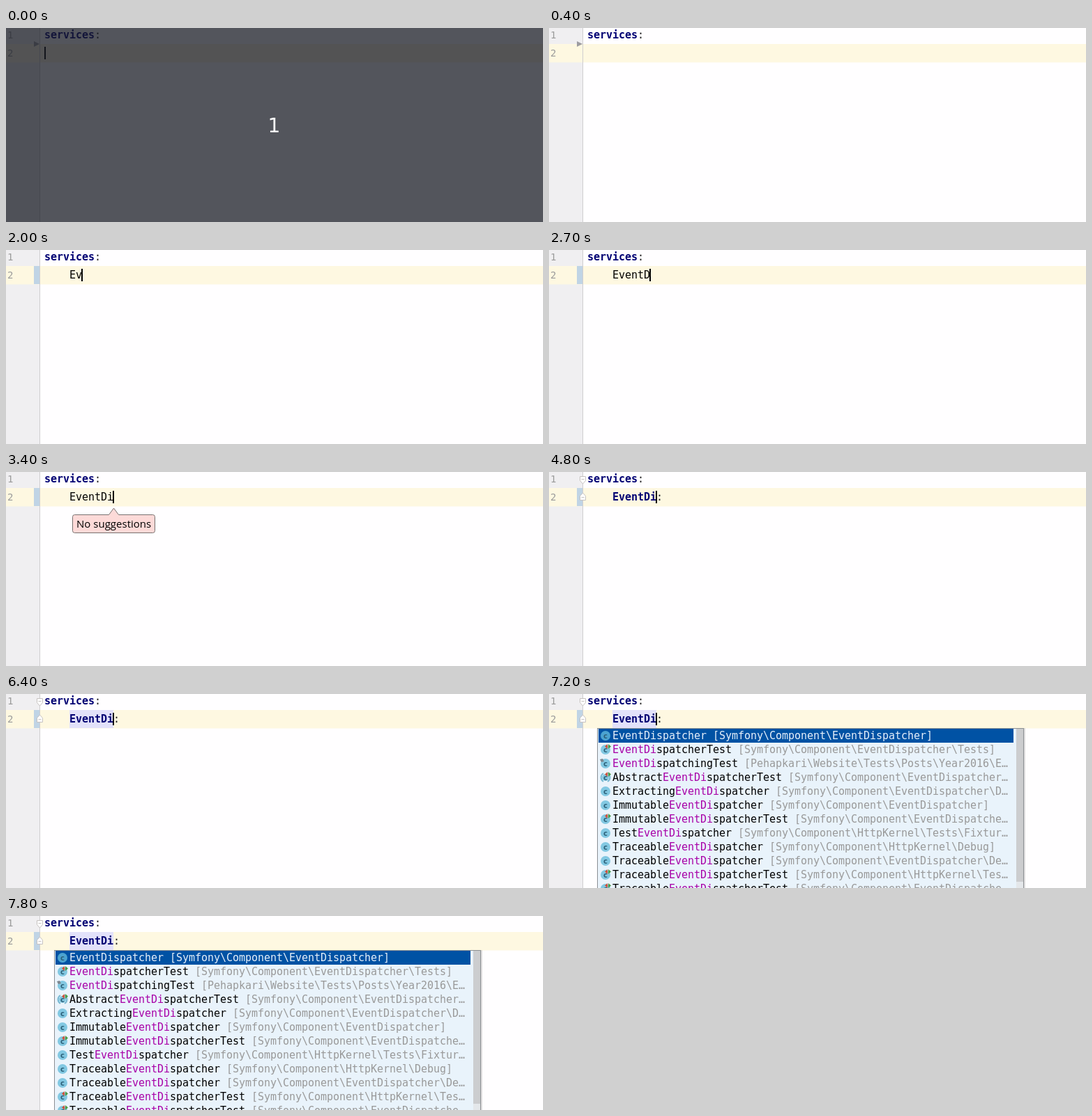
Recreate the animation shown at these times as an HTML page. Size 770 by 279 pixels, loop 8000 ms.

```html
<!DOCTYPE html>
<html lang="en">
<head>
<meta charset="utf-8">
<title>Editor completion</title>
<style>
  html, body { margin: 0; width: 100%; height: 100%; overflow: hidden; background: #fffeff; }
  svg { display: block; }
  text { font: 15px "DejaVu Sans Mono", monospace; letter-spacing: -.03px; }
  .num { font-size: 14px; fill: #9b9b9b; }
  .key { font-weight: bold; fill: #000073; }
  .hint { font: 15px "Open Sans", sans-serif; letter-spacing: 0; }
  .count { font: 28px "DejaVu Sans", sans-serif; fill: #fff; text-anchor: middle; }
  .match { fill: #a800a8; }
  .path { fill: #999; }
  .picked, .picked tspan { fill: #e6effa; }
  .c { font: bold 10px "DejaVu Sans", sans-serif; fill: #2c6079; text-anchor: middle; }
  .fold path { fill: #fffeff; stroke: #c6c2c0; }
</style>
</head>
<body>
<svg width="770" height="279" viewBox="0 0 770 279">
  <rect width="770" height="279" fill="#fffeff"/>
  <rect width="48" height="279" fill="#f0eff1"/>
  <rect y="23" width="770" height="26.5" fill="#fef8e1"/>
  <rect id="usage" x="91" y="23" width="63" height="26" fill="#e2e1fa"/>
  <path id="removed" d="M40 19l8 4l-8 4z" fill="#9d9ca0"/>
  <rect id="changed" x="40" y="23" width="8" height="26" fill="#c0d4e5"/>
  <path d="M48.5 0V279" stroke="#cfcecf"/>
  <text class="num" x="2" y="15">1</text>
  <text class="num" x="2" y="41">2</text>
  <g id="folds" class="fold">
    <path d="M44.5 6.5h8v6l-4 4.5l-4-4.5zM46.5 10.5h4"/>
    <path d="M44.5 40.5h8v-6l-4-4.5l-4 4.5zM46.5 36.5h4"/>
  </g>
  <text x="55" y="15"><tspan class="key">services</tspan><tspan fill="#222">:</tspan></text>
  <text id="typed" x="91" y="41"></text>
  <text id="colon" x="154" y="41" fill="#222">:</text>
  <rect id="caret" y="27" width="2" height="18"/>
  <g id="balloon">
    <path d="M98.5 61.5H147.5L154.5 52L161.5 61.5H210.5q3 0 3 3V84.5q0 3-3 3H98.5q-3 0-3-3V64.5q0-3 3-3z" fill="#fddad8" stroke="#77706f"/>
    <text class="hint" x="101" y="80">No suggestions</text>
  </g>
  <g id="popup">
    <rect x="69" y="49" width="614" height="232" fill="#000" opacity=".13"/>
    <rect x="69.5" y="49.5" width="611" height="240" fill="#e9f3fb" stroke="#8b8f93"/>
    <rect x="71" y="50" width="595" height="20" fill="#0052a4"/>
    <rect x="670" y="50" width="10" height="229" fill="#e4e7ea"/>
    <rect x="670" y="50" width="10" height="220" fill="#cccdcf"/>
    <g id="rows"></g>
  </g>
  <g id="shade">
    <rect width="770" height="279" fill="#1a1c26" opacity=".75"/>
    <text class="count" x="384.5" y="150">1</text>
  </g>
</svg>
<script>
const $ = id => document.getElementById(id);
const word = 'EventDi', maxChars = 63;
const dispatcher = 'Symfony\\Component\\EventDispatcher';
const kernel = 'Symfony\\Component\\HttpKernel';

// prefix, rest after the match, namespace
const items = [
  ['', 'spatcher', dispatcher],
  ['', 'spatcherTest', dispatcher + '\\Tests'],
  ['', 'spatchingTest', 'Pehapkari\\Website\\Tests\\Posts\\Year2016\\EventDispatcher'],
  ['Abstract', 'spatcherTest', dispatcher + '\\Tests'],
  ['Extracting', 'spatcher', dispatcher + '\\Debug'],
  ['Immutable', 'spatcher', dispatcher],
  ['Immutable', 'spatcherTest', dispatcher + '\\Tests'],
  ['Test', 'spatcher', kernel + '\\Tests\\Fixtures'],
  ['Traceable', 'spatcher', kernel + '\\Debug'],
  ['Traceable', 'spatcher', dispatcher + '\\Debug'],
  ['Traceable', 'spatcherTest', kernel + '\\Tests\\Debug'],
  ['Traceable', 'spatcherTest', dispatcher + '\\Tests\\Debug']
];

function icon(prefix, rest, i) {
  const isAbstract = prefix === 'Abstract';
  let art = isAbstract
    ? '<path d="M78 -6a7 7 0 0 0 0 12M84 -6a7 7 0 0 1 0 12" fill="none" stroke="#78b9d3" stroke-width="2"/>' : '';
  art += `<circle cx="81" r="${isAbstract ? 5 : 7}" fill="${i ? '#82c8e2' : '#4ba3d0'}"/>` +
    '<text class="c" x="81" y="3.5">c</text>';
  if (rest.endsWith('ingTest')) art += '<path d="M73 -6l4 -1l2 4l-4 1z" fill="#7d8790"/>';
  else if (rest.endsWith('Test'))
    art += '<path d="M84 -8v7l-4 -3.5z" fill="#d0533c"/><path d="M85 -8v7l4 -3.5z" fill="#4b9a45"/>';
  return art;
}

$('rows').innerHTML = items.map(([prefix, rest, space], i) => {
  const name = prefix + word + rest;
  const room = maxChars - name.length - 1;
  let path = `[${space}]`;
  if (path.length > room) path = path.slice(0, room - 1) + '…';
  return `<g transform="translate(0 ${60 + 20 * i})">${icon(prefix, rest, i)}
    <text class="${i ? '' : 'picked'}" x="91" y="5">${prefix}<tspan class="match">${word}</tspan>${rest}<tspan
    class="path" x="${91 + 9 * (name.length + 1)}">${path}</tspan></text></g>`;
}).join('');

const keyTimes = [1500, 2000, 2100, 2200, 2300, 2700, 2900];
const caretGaps = [[400, 800], [1400, 1500], [3700, 4300], [5900, 6400], [7800, 8000]];
const spans = {
  shade: [0, 400], removed: [0, 1600], changed: [800, 8000], balloon: [3400, 4300],
  colon: [4700, 8000], folds: [4800, 8000], usage: [5500, 8000], popup: [7200, 8000]
};
const within = (t, [from, to]) => t >= from && t < to;
const show = (id, on) => $(id).setAttribute('visibility', on ? 'visible' : 'hidden');

function draw(t) {
  for (const id in spans) show(id, within(t, spans[id]));
  const count = keyTimes.filter(k => t >= k).length;
  $('typed').textContent = word.slice(0, count);
  $('typed').setAttribute('class', t >= 4800 ? 'key' : '');
  const afterColon = within(t, [4700, 4800]);
  $('caret').setAttribute('x', t < 800 ? 55 : 90 + 9 * (count + afterColon));
  show('caret', !caretGaps.some(gap => within(t, gap)));
}

const start = performance.now();
function tick() {
  draw((performance.now() - start) % 8000);
  requestAnimationFrame(tick);
}
tick();
</script>
</body>
</html>
```
